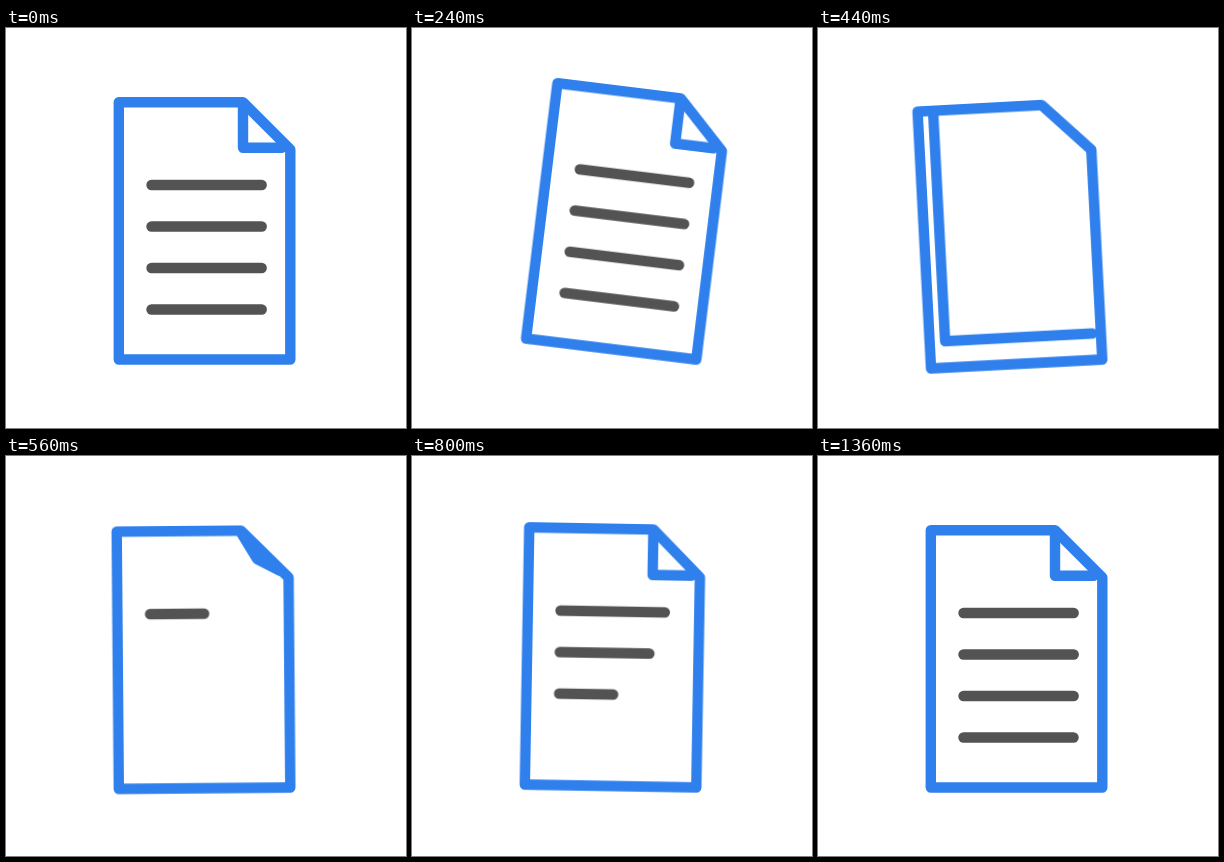
An HTML page that plays this animation: 400x400 px, repeating every 1.97 s.

```html
<!DOCTYPE html>
<html lang="en">
<head>
<meta charset="utf-8">
<title>Page turn</title>
<style>
  :root {
    --loop: 1970ms;
    --smooth: cubic-bezier(.333, 0, .667, 1);
  }
  html, body {
    margin: 0;
    width: 100%;
    height: 100%;
    overflow: hidden;
    background: #fff;
  }
  svg { display: block; width: 100vw; height: 100vh; }

  path {
    fill: none;
    stroke-width: 10.4px;
    stroke-linecap: round;
    stroke-linejoin: round;
  }
  .blue { stroke: #2f80ed; }
  .text { stroke: #535353; }

  .page {
    transform-origin: 284.3px 331.5px;
    animation: swing var(--loop) var(--smooth) infinite;
  }
  .cover {
    fill: #fff;
    animation: wipe var(--loop) var(--smooth) infinite;
  }
  .fold { animation: fold var(--loop) var(--smooth) infinite; }

  /* New lines sit on the turned page and write in one after another. */
  .new path {
    stroke-dasharray: 110.2 140;
    animation: write var(--loop) calc(var(--i) * 120ms) infinite backwards;
  }

  @keyframes swing {
    0% { transform: rotate(0deg); }
    12.183% { transform: rotate(7deg); }
    22.335% { transform: rotate(-3deg); }
    34.518% { transform: rotate(2deg); }
    46.701%, 100% { transform: rotate(0deg); }
  }
  @keyframes wipe {
    0%, 12.183% { transform: translate(0, 0); }
    25.28%, 100% { transform: translate(-124.2px, 211.7px); }
  }
  @keyframes fold {
    0%, 12.183% { d: path("M237 76L237 119.8L275.6 119.8"); }
    25.28%, 26.39% { d: path("M112.8 76L112.8 331.5L275.6 331.5"); }
    26.4% { d: path("M237 76L259 96.5L275.6 112.8"); }
    32.49%, 100% { d: path("M237 76L237 119.8L275.6 119.8"); }
  }
  @keyframes write {
    0%, 23.49% { stroke-dashoffset: 110.2px; opacity: 0; }
    23.5% {
      stroke-dashoffset: 110.2px;
      opacity: 1;
      animation-timing-function: cubic-bezier(.25, 1, .5, 1);
    }
    56%, 100% { stroke-dashoffset: 0px; opacity: 1; }
  }
</style>
</head>
<body>
<svg viewBox="0 0 400 400">
  <g class="page">
    <g class="text">
      <path d="M145.5 157h110.2"/>
      <path d="M145.5 198.5h110.2"/>
      <path d="M145.5 240h110.2"/>
      <path d="M145.5 281.5h110.2"/>
    </g>
    <rect class="cover" x="237" y="-140" width="176" height="259.8"/>
    <g class="text new">
      <path style="--i:0" d="M145.5 157h110.2"/>
      <path style="--i:1" d="M145.5 198.5h110.2"/>
      <path style="--i:2" d="M145.5 240h110.2"/>
      <path style="--i:3" d="M145.5 281.5h110.2"/>
    </g>
    <path class="blue fold" d="M237 76L237 119.8L275.6 119.8"/>
    <path class="blue" d="M112.8 74.2H237L284.3 121.5V331.5H112.8Z"/>
  </g>
</svg>
</body>
</html>
```
